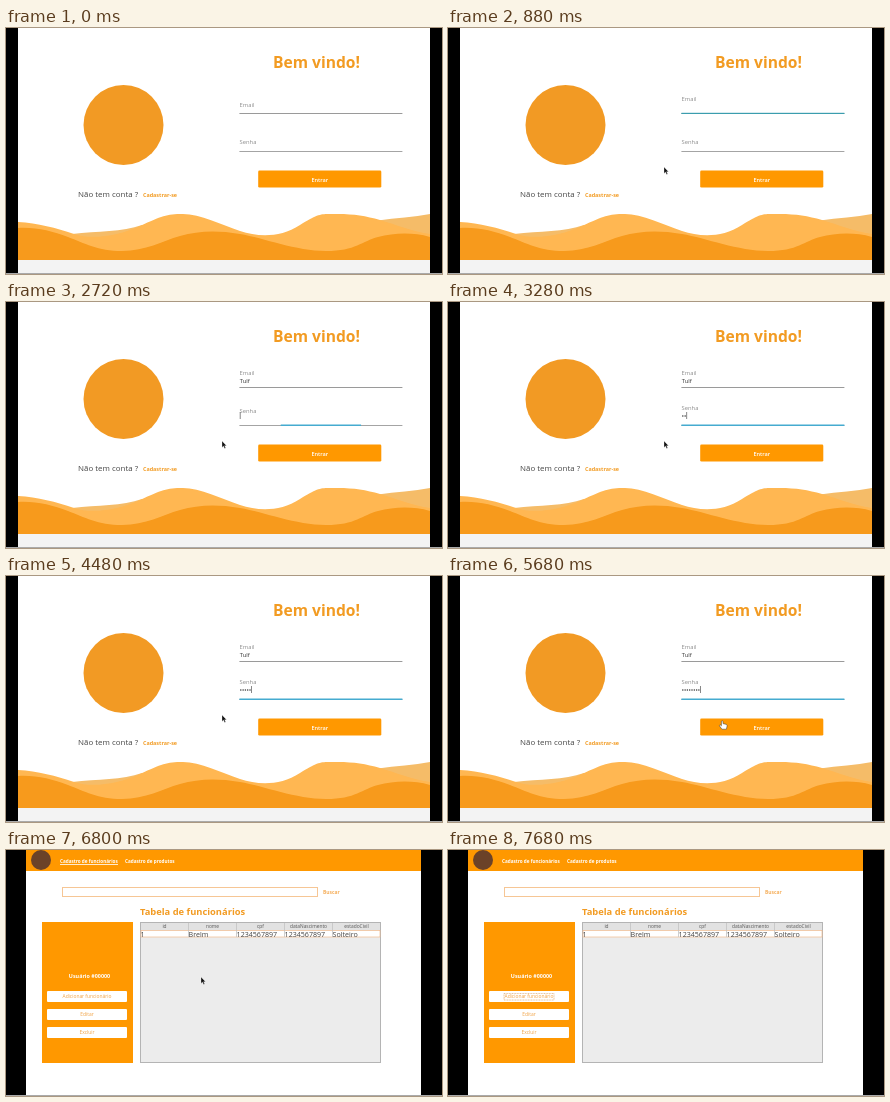
Animation of 436x246 px, one loop 8 s. Source, as an HTML page:

```html
<!DOCTYPE html>
<html lang="pt-BR">
<head>
<meta charset="utf-8">
<title>Login</title>
<style>
  html, body { margin: 0; width: 100%; height: 100%; overflow: hidden; background: #000; }
  svg { display: block; width: 436px; height: 246px; }
  text { font-family: "Open Sans", "Noto Sans", sans-serif; white-space: pre; }
  .b { font-weight: 700; }
  .mid { text-anchor: middle; }
  .o { fill: #f29b22; }
  .w { fill: #fff; }
  .label { font-size: 5.8px; fill: #8c8c8c; }
  .typed { font-size: 5.8px; fill: #333; }
  .link { font-size: 4.64px; fill: #fff; font-weight: 700; }
  .btn { font-size: 4.9px; fill: #f0a040; text-anchor: middle; }
  .head { font-size: 4.85px; fill: #555; text-anchor: middle; }
  .cell { font-size: 7.1px; fill: #444; }
</style>
</head>
<body>
<svg viewBox="0 0 436 246">
  <rect width="436" height="245"/>
  <rect y="245" width="436" height="1" fill="#aaa"/>

  <g id="login">
    <rect x="12" width="412" height="245" class="w"/>
    <rect x="12" y="231.5" width="412" height="13.5" fill="#f3f3f3"/>
    <path fill="#f5bc68" d="M12 215 L66 206 C92 203 116 204 136 197 L200 215 H340 L372 192.5 C390 190 408 189 424 186 V232 H12Z"/>
    <path fill="#ffb752" d="M12 194 C32 195 50 200 68 206 S112 208 134 198 S160 186 177 186 S216 197 234 203 S274 210 294 197 S316 186 332 186 S360 188 374 192 S408 204 424 206 V232 H12Z"/>
    <path fill="#f79a1c" d="M12 200 C30 199 46 203 62 209 S92 223 116 223 S156 213 174 208 S210 202 234 206 S290 223 320 223 S356 213 372 209 S406 204 424 209 V232 H12Z"/>
    <circle cx="117.5" cy="97" r="40" fill="#f29a24"/>
    <text x="72" y="169.2" font-size="7.95" fill="#444">Não tem conta ?</text>
    <text x="137" y="169" font-size="5.4" class="b o">Cadastrar-se</text>
    <text x="310.5" y="39.5" font-size="15.6" class="b o mid">Bem vindo!</text>

    <rect x="233.4" y="85" width="163" height="1" fill="#9a9a9a"/>
    <rect id="mailLine" y="84.8" height="1.2" fill="#3b9dae"/>
    <text id="mailLabel" x="233.6" class="label">Email</text>
    <text id="mail" x="233.8" y="81" class="typed"></text>

    <rect x="233.4" y="123" width="163" height="1" fill="#a4a4a4"/>
    <rect id="passLine" y="122.5" height="1.5" fill="#45abd0"/>
    <text id="passLabel" x="233.6" class="label">Senha</text>
    <g id="dots" fill="#333"></g>
    <rect id="caret" width=".7" height="7" fill="#555"/>

    <rect x="252.2" y="142.6" width="123.1" height="17" rx="1.3" fill="#ff9800"/>
    <text x="313.8" y="153.6" font-size="5.6" font-weight="600" class="w mid">Entrar</text>
  </g>

  <g id="staff">
    <rect x="20" width="395" height="245" class="w"/>
    <rect x="20" width="395" height="21" fill="#ff9800"/>
    <circle cx="35" cy="10" r="10" fill="#6b4228"/>
    <text x="54" y="13" class="link">Cadastro de funcionários</text>
    <rect id="underline" x="54" y="14" width="58" height=".8" class="w"/>
    <text x="119" y="13" class="link">Cadastro de produtos</text>
    <rect x="56.5" y="37.5" width="255" height="9" fill="#fff" stroke="#f6c695"/>
    <text x="317" y="44" font-size="4.9" class="b" fill="#f5ae5a">Buscar</text>
    <text x="134" y="65.3" font-size="9.36" class="b o">Tabela de funcionários</text>

    <rect x="36" y="72" width="91" height="141" fill="#ff9800"/>
    <text x="83.5" y="128" font-size="5.4" class="b w mid">Usuário #00000</text>
    <g id="buttons"></g>
    <rect id="focus" x="56" y="143.5" width="50" height="6.5" fill="none" stroke="#d99a55" stroke-width=".6" stroke-dasharray="1 .6"/>

    <rect x="134.5" y="72.5" width="240" height="140" fill="#ececec" stroke="#b4b4b4"/>
    <rect x="135" y="73" width="239" height="7" fill="#e2e2e2"/>
    <rect x="135" y="80.5" width="239" height="6.5" fill="#fff" stroke="#f0b98c" stroke-width=".7"/>
    <g id="table"></g>
  </g>

  <path id="arrow" d="M0 0V6.4L1.5 5.1 2.6 7.6 3.7 7.1 2.6 4.7H4.5Z" fill="#111" stroke="#fff" stroke-width=".3"/>
  <path id="hand" d="M0 .6Q.8 -.3 1.6 .6V3L5 3.8Q5.9 4.2 5.7 5.4L5 8.6H.5L-2 5.2Q-1.9 4.1 -.8 4.5L0 5.2Z" fill="#fff" stroke="#333" stroke-width=".5"/>
</svg>

<script>
const LOOP = 8000, BLINK = 480;
const NAME = "Tulf";
const MAIL_KEYS = [1840, 2000, 2240, 2400];
const PASS_KEYS = [3120, 3280, 3600, 3920, 4320, 4640, 5040, 5360];
const MAIL_FOCUS = 80, PASS_FOCUS = 2640, BLUR = 6080, ENTER = 6800, TAB = 7600;
// time, x, y of the pointer tip
const PATH = [[80, 216, 139], [5360, 216, 139], [5640, 273, 144.5], [5840, 275, 145], [6080, 276, 145.5]];

const $ = id => document.getElementById(id);
const clamp = v => Math.max(0, Math.min(1, v));
const ease = v => 1 - (1 - clamp(v)) ** 3;
const show = (id, on) => $(id).setAttribute("visibility", on ? "inherit" : "hidden");

function add(parent, tag, attrs, text = "") {
  const el = document.createElementNS("http://www.w3.org/2000/svg", tag);
  for (const k in attrs) el.setAttribute(k, attrs[k]);
  el.textContent = text;
  $(parent).append(el);
  return el;
}

["Adicionar funcionário", "Editar", "Excluir"].forEach((label, i) => {
  const y = 141 + 18 * i;
  add("buttons", "rect", { x: 41, y, width: 80, height: 11, rx: 1, fill: "#fff" });
  add("buttons", "text", { x: 81, y: y + 7.4, class: "btn" }, label);
});

const COLUMNS = [
  ["id", "1"], ["nome", "Brelm"], ["cpf", "1234567897"],
  ["dataNascimento", "1234567897"], ["estadoCivil", "Solteiro"]
];
COLUMNS.forEach(([head, value], i) => {
  const x = 134 + 48 * i;
  if (i) add("table", "rect", { x, y: 73, width: .8, height: 14, fill: "#c4c4c4" });
  add("table", "text", { x: x + 24.5, y: 78.3, class: "head" }, head);
  add("table", "text", { x: x + .6, y: 86.5, class: "cell" }, value);
});

const dots = PASS_KEYS.map((_, i) =>
  add("dots", "circle", { cx: 234.8 + 2.3 * i, cy: 114, r: .75 }));

const typed = (keys, t) => keys.filter(k => k <= t).length;

function floatLabel(id, t, start, from, to) {
  $(id).setAttribute("y", from + (to - from) * ease((t - start) / 320));
}

function focusLine(id, t, start, end) {
  const w = t < end ? 163 * ease((t - start) / 400) : 0;
  $(id).setAttribute("x", 314.9 - w / 2);
  $(id).setAttribute("width", w);
}

function drawLogin(t) {
  floatLabel("mailLabel", t, MAIL_FOCUS, 78.5, 72.6);
  floatLabel("passLabel", t, PASS_FOCUS, 116, 107.6);
  focusLine("mailLine", t, MAIL_FOCUS, PASS_FOCUS);
  focusLine("passLine", t, PASS_FOCUS, ENTER);

  const letters = typed(MAIL_KEYS, t), count = typed(PASS_KEYS, t);
  $("mail").textContent = NAME.slice(0, letters);
  dots.forEach((d, i) => d.setAttribute("visibility", i < count ? "inherit" : "hidden"));

  const inPass = t >= PASS_FOCUS;
  const last = inPass
    ? (count ? PASS_KEYS[count - 1] : PASS_FOCUS)
    : (letters ? MAIL_KEYS[letters - 1] : 400);
  const x = inPass
    ? 233.8 + 2.3 * count
    : 234 + (letters ? $("mail").getComputedTextLength() : 0);
  $("caret").setAttribute("x", x);
  $("caret").setAttribute("y", inPass ? 110 : 75);
  show("caret", t >= last && t < BLUR && Math.floor((t - last) / BLINK) % 2 === 0);
}

function pointer(t) {
  if (t >= ENTER) return [195, 127];
  const i = PATH.findIndex(p => p[0] > t);
  if (i < 0) return PATH[PATH.length - 1].slice(1);
  if (i === 0) return PATH[0].slice(1);
  const a = PATH[i - 1], b = PATH[i], k = (t - a[0]) / (b[0] - a[0]);
  return [a[1] + (b[1] - a[1]) * k, a[2] + (b[2] - a[2]) * k];
}

function draw(t) {
  const inside = t >= ENTER;
  show("login", !inside);
  show("staff", inside);
  if (!inside) drawLogin(t);
  show("underline", inside && t < TAB);
  show("focus", t >= TAB);

  const [x, y] = pointer(t), visible = t >= 80 && t < TAB;
  const over = !inside && x > 252 && y > 141;
  for (const id of ["arrow", "hand"]) {
    $(id).setAttribute("transform", `translate(${x} ${y})`);
    show(id, visible && over === (id === "hand"));
  }
}

// Hidden groups must not leave inheriting children visible
const start = performance.now();
function tick() {
  draw((performance.now() - start) % LOOP);
  requestAnimationFrame(tick);
}
tick();
</script>
</body>
</html>
```
